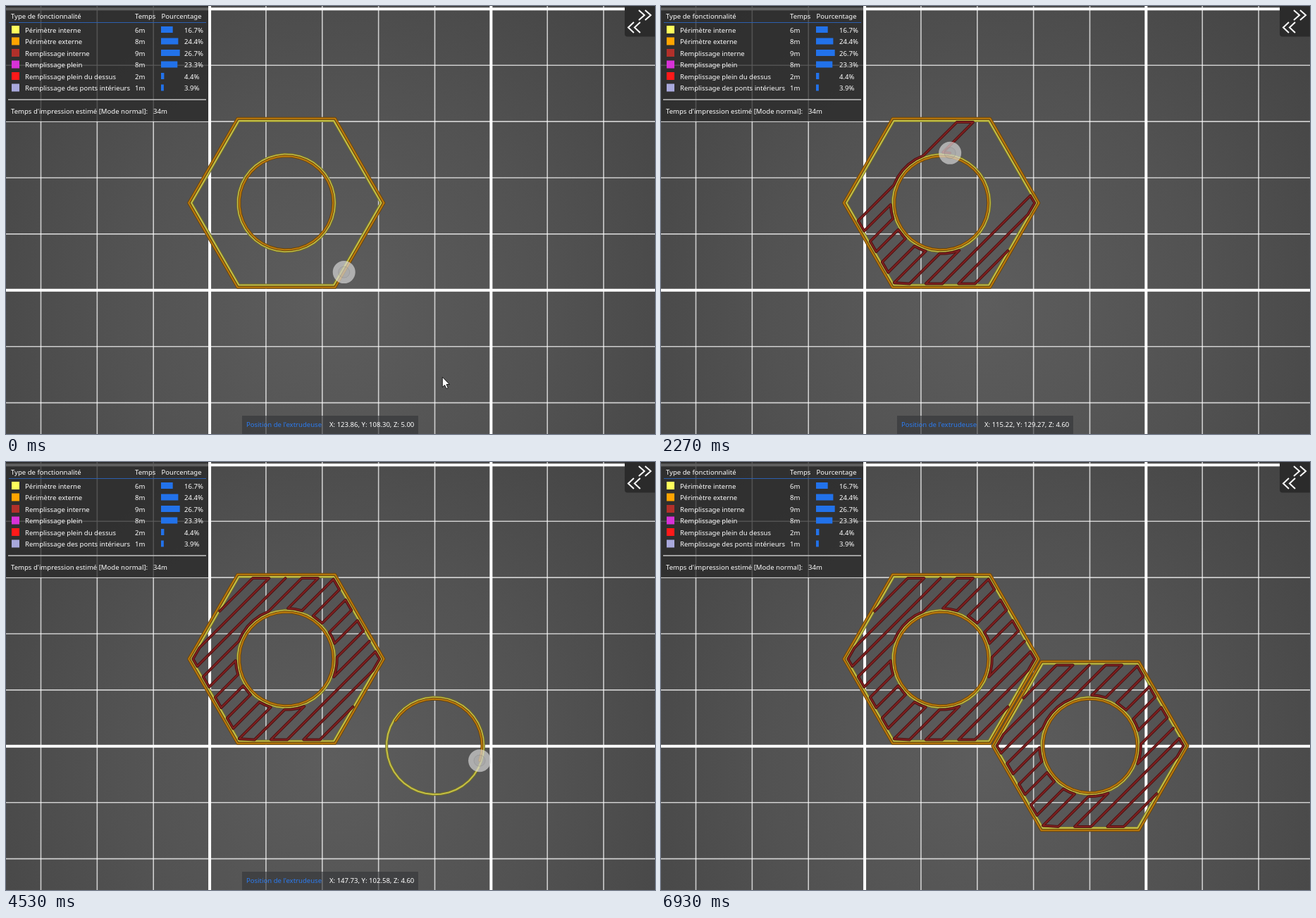
These frames come from a looping animation (921x608 px, 8.79 s). An HTML page:

```html
<!DOCTYPE html>
<html lang="fr">
<head>
<meta charset="utf-8">
<title>Aperçu du parcours d'impression</title>
<style>
  html, body { margin: 0; width: 100%; height: 100%; overflow: hidden; background: #505050; }
  svg { display: block; width: 921px; height: 608px; }
  text { font: 9.55px "Noto Sans", "Open Sans", sans-serif; fill: #fff; white-space: pre; }
  .strand { fill: none; stroke-linecap: round; stroke-linejoin: round; }
</style>
</head>
<body>
<svg viewBox="0 0 921 608">
  <defs>
    <radialGradient id="bed" gradientUnits="userSpaceOnUse" cx="460" cy="420" r="620">
      <stop offset="0" stop-color="#5d5d5d"/>
      <stop offset=".5" stop-color="#525252"/>
      <stop offset="1" stop-color="#434343"/>
    </radialGradient>
  </defs>
  <rect width="921" height="608" fill="url(#bed)"/>
  <g id="grid" stroke="#fff"></g>
  <g id="strands"></g>
  <g id="nozzle">
    <circle r="16" fill="#dcdcdc" fill-opacity=".66"/>
    <circle r="8" fill="#888" fill-opacity=".12" stroke="#808080" stroke-opacity=".35"/>
  </g>
  <g id="legend">
    <rect width="287" height="164" fill="#282828" fill-opacity=".74"/>
    <text x="7" y="17.5">Type de fonctionnalité</text>
    <text x="183" y="17.5">Temps</text>
    <text x="220.5" y="17.5">Pourcentage</text>
    <path d="M4 23.5H284" stroke="#2c5fae"/>
    <path d="M3 133H284" stroke="#c4c4c4" stroke-width="1.6"/>
    <text x="7" y="152.5">Temps d'impression estimé [Mode normal]:</text>
    <text x="209" y="152.5">34m</text>
  </g>
  <path d="M878 0H921V43.5H882Q878 43.5 878 39.500Z" fill="#2b2b2b"/>
  <path d="M898 6l8 7-8 7M907 6l8 7-8 7M891 23l-8 7.500 8 7.500M900 23l-8 7.500 8 7.500"
        fill="none" stroke="#fff" stroke-width="2"/>
  <g id="status">
    <rect x="335" y="582" width="250" height="26" fill="#323438" fill-opacity=".62"/>
    <text x="341" y="597.500" style="fill:#2b7bf0">Position de l'extrudeuse</text>
    <text id="coords" x="459" y="597.500"></text>
  </g>
  <path id="pointer" d="M0 0V14.500L3.300 11.500L5.600 16.600L8 15.500L5.700 10.500H10Z"
        fill="#fff" stroke="#111" stroke-width=".9"/>
</svg>
<script>
const LOOP = 8790, FPS = 15;
const $ = id => document.getElementById(id);
const add = (parent, tag, attrs, text = '') => {
  const el = document.createElementNS('http://www.w3.org/2000/svg', tag);
  for (const k in attrs) el.setAttribute(k, attrs[k]);
  el.textContent = text;
  return parent.appendChild(el);
};

// Bed grid: every fifth line is heavy
for (let i = 0; i < 11; i++) {
  const x = 49.5 + i * 79.86, y = 4.3 + i * 79.9;
  const pen = heavy => heavy ? { 'stroke-width': 4 } : { 'stroke-width': 1.6, opacity: .72 };
  add($('grid'), 'path', { d: `M${x} 0V608`, ...pen(i % 5 === 3) });
  if (i < 8) add($('grid'), 'path', { d: `M0 ${y}H921`, ...pen(i % 5 === 0) });
}

// Legend rows
[
  ['Périmètre interne', '#ffff5c', 6, 16.7],
  ['Périmètre externe', '#ffa400', 8, 24.4],
  ['Remplissage interne', '#b1302a', 9, 26.7],
  ['Remplissage plein', '#d732d7', 8, 23.3],
  ['Remplissage plein du dessus', '#ff1a1a', 2, 4.4],
  ['Remplissage des ponts intérieurs', '#a8a8dc', 1, 3.9]
].forEach(([name, fill, min, pct], i) => {
  const g = $('legend'), y = 33.5 + i * 16.5, base = y + 4;
  add(g, 'rect', { x: 8, y: y - 5.5, width: 11, height: 11, fill });
  add(g, 'text', { x: 27, y: base }, name);
  add(g, 'text', { x: 183, y: base }, min + 'm');
  add(g, 'rect', { x: 220, y: y - 4.5, width: pct, height: 9, fill: '#2272ea' });
  add(g, 'text', { x: 253, y: base }, pct.toFixed(1) + '%');
});

// Tool path
const INK = {
  inner: ['#6f6c2a', '#c4bf45'],
  outer: ['#6a430a', '#ba7a0c'],
  fill: ['#4b1212', '#7e1f1f']
};
const RAD = Math.PI / 180;
const GAP = 16.405, FILL_R = 72, FILL_A = 114.7, STEP = 360 / 39;
const polar = (r, deg) => [r * Math.cos(deg * RAD), r * Math.sin(deg * RAD)];
const moves = [], strands = [];

function go(x, y, ink, z = 4.6) {
  const last = moves[moves.length - 1];
  if (ink && last.ink !== ink) {
    const [dark, light] = INK[ink].map((stroke, i) =>
      add($('strands'), 'path', { class: 'strand', stroke, 'stroke-width': i ? 2.1 : 4 }));
    strands.push({ from: moves.length, pts: [last], dark, light });
  }
  const move = { x, y, ink, z };
  if (ink) strands[strands.length - 1].pts.push(move);
  moves.push(move);
}

// Where infill line k meets the hexagon; side 1 is lower left, -1 upper right
function hexEnd(k, side) {
  const p = polar(k * GAP, 45), d = polar(side, 135);
  let t = Infinity;
  for (let a = 30; a < 390; a += 60) {
    const n = polar(1, a), slope = n[0] * d[0] + n[1] * d[1];
    if (slope > 1e-6) t = Math.min(t, (FILL_A - n[0] * p[0] - n[1] * p[1]) / slope);
  }
  return [p[0] + d[0] * t, p[1] + d[1] * t];
}
const holeAngle = (k, side) => 45 + side * Math.acos(k * GAP / FILL_R) / RAD;

function printNut(cx, cy) {
  const mark = {}, here = () => moves.length - 1;
  const to = ([x, y], ink, z) => go(cx + x, cy + y, ink, z);

  const hole = (r, ink, z) => {
    to(polar(r, 212.3), null, z);
    mark[ink] = here();
    for (let i = 1; i <= 39; i++) to(polar(r, 212.3 + i * STEP), ink);
  };
  const hex = (apothem, ink) => {
    for (let i = 0; i <= 6; i++) to(polar(apothem / Math.cos(30 * RAD), 60 - 60 * i), i ? ink : null);
  };
  hole(69, 'inner', 5);
  hole(66.5, 'outer');
  hex(116.7, 'inner');
  hex(120, 'outer');
  to([81.9, 98.3], null, 5);
  mark.wipe = here();

  const start = hexEnd(7, -1);
  const head = [
    [start[0] + 3, start[1] - 3], hexEnd(7, 1), hexEnd(6, 1), hexEnd(6, -1),
    polar(FILL_A / Math.cos(30 * RAD), 0), hexEnd(5, -1), hexEnd(5, 1)
  ];
  const trace = pts => pts.forEach((p, i) => to(p, i ? 'fill' : null));
  trace(head);
  mark.right = here() - 1;

  let angle = null;
  const onHex = (k, side) => { to(hexEnd(k, side), 'fill'); angle = null; };
  const onHole = (k, side) => {
    const end = holeAngle(k, side);
    if (angle === null) to(polar(FILL_R, end), 'fill');
    else {
      const sweep = (end - angle + 540) % 360 - 180, n = Math.max(1, Math.round(sweep / 9));
      for (let i = 1; i <= n; i++) to(polar(FILL_R, angle + sweep * i / n), 'fill');
    }
    angle = end;
    mark[k + ':' + side] = here();
  };
  for (const side of [1, -1])
    for (let i = 4; i >= -4; i--) {
      const k = i * side, pair = [onHex, onHole];
      if ((k % 2 === 0) !== (side === 1)) pair.reverse();
      pair.forEach(visit => visit(k, side));
    }
  mark.ring = here();
  trace(head.reverse().map(([x, y]) => [-x, -y]));
  mark.end = here();
  return mark;
}
const a = printNut(397.8, 279.8), b = printNut(609, 403.2);

// [tick, last move done]
const KEYS = [
  [0, a.wipe], [17, a.wipe], [18, a.wipe + 3], [31, a['-4:1'] + 2], [32, a['-4:1'] + 4],
  [33, a['-3:-1']], [34, a['-3:-1'] + 1], [38, a.ring], [39, a.ring], [44, a.end],
  [45, b.inner], [53, b.inner + 13], [68, b.outer + 18], [82, b.right],
  [95, b.ring + 2], [103, b.end], [999, b.end]
];
function moveAt(tick) {
  const i = KEYS.findIndex(k => k[0] > tick);
  const [t0, m0] = KEYS[i - 1], [t1, m1] = KEYS[i];
  // long pauses jump at their last tick
  return Math.round(m0 + (m1 - m0) * (tick - t0) / (t1 - t0));
}

const POINTER = ['translate(619.3 527)', 'translate(635 592)'];
let shown = -1;
function draw(tick) {
  const n = moveAt(tick), { x, y, z } = moves[n], done = tick >= 104;
  for (const s of strands) {
    const count = n - s.from + 2;
    const d = count < 2 ? '' :
      'M' + s.pts.slice(0, count).map(p => p.x.toFixed(2) + ' ' + p.y.toFixed(2)).join('L');
    s.dark.setAttribute('d', d);
    s.light.setAttribute('d', d);
  }
  $('nozzle').setAttribute('transform', `translate(${x} ${y})`);
  $('coords').textContent = `X: ${(121.41 + (x - 460) / 8.057).toFixed(2)}, ` +
    `Y: ${(117.48 - (y - 304) / 8.07).toFixed(2)}, Z: ${z.toFixed(2)}`;
  for (const id of ['nozzle', 'status']) $(id).style.display = done ? 'none' : '';
  $('pointer').style.display = tick < 2 ? '' : 'none';
  $('pointer').setAttribute('transform', POINTER[Math.min(tick, 1)]);
}

const origin = performance.now();
function loop() {
  const t = (performance.now() - origin) % LOOP;
  const tick = Math.floor((t + 4) * FPS / 1000);
  if (tick !== shown) draw(shown = tick);
  requestAnimationFrame(loop);
}
loop();
</script>
</body>
</html>
```
